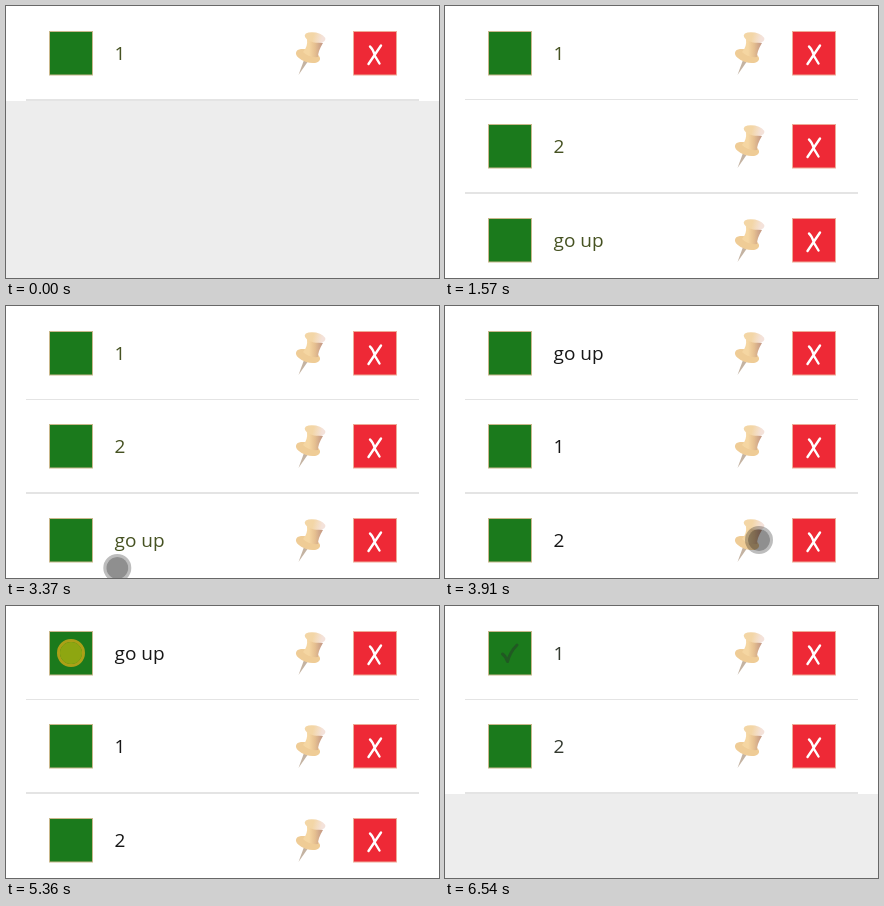
These frames come from a looping animation (433 by 272 pixels, 6860 ms). An HTML page:

```html
<!DOCTYPE html>
<html lang="en">
<head>
<meta charset="utf-8">
<title>Todo list</title>
<style>
  html, body { margin: 0; width: 100%; height: 100%; overflow: hidden; background: #fff; }
  svg { display: block; width: 433px; height: 272px; }
  text { font: 19px "Open Sans", "Noto Sans", sans-serif; }
</style>
</head>
<body>
<svg viewBox="0 0 433 272">
  <defs>
    <linearGradient id="cap">
      <stop offset=".4" stop-color="#f3d6a6"/>
      <stop offset=".85" stop-color="#f4e2da"/>
    </linearGradient>
    <linearGradient id="body">
      <stop offset=".3" stop-color="#f5d6a2"/>
      <stop offset=".6" stop-color="#e6c090"/>
      <stop offset=".9" stop-color="#c99f88"/>
    </linearGradient>
    <g id="pin">
      <path d="M298 54L292.5 69L301.5 56Z" fill="#c4b3a2"/>
      <ellipse cx="302" cy="50" rx="12.5" ry="6.2" transform="rotate(18 302 50)" fill="#efcc96"/>
      <path d="M301 33Q302 41 297 46Q303 52 312 51Q312 45 317 37Z" fill="url(#body)"/>
      <ellipse cx="309" cy="31.5" rx="10.5" ry="5" transform="rotate(12 309 31.5)" fill="url(#cap)"/>
    </g>
    <g id="row">
      <rect y="1" width="433" height="94" fill="#fff"/>
      <rect x="20" y="93" width="393" height="2" fill="#e4e4e4"/>
      <rect x="43.5" y="25.5" width="43" height="43.5" fill="#1b7a1c" stroke="#c9b88c"/>
      <use href="#pin"/>
      <rect x="347.5" y="25.5" width="43" height="43.5" fill="#ee2936" stroke="#eeaa98"/>
      <path d="M364 40.5Q367 43 369 50L373.5 57.5M375 39.5L362.5 58" fill="none" stroke="#fff" stroke-width="2.4" stroke-linecap="round"/>
      </g>
  </defs>
  <rect width="433" height="272" fill="#ededed"/>
  <rect width="433" height="4" fill="#fff"/>
  <g id="rows"></g>
  <path id="tick" d="M57.5 48Q60.5 50 62.5 55.5Q65 46 72 39" fill="none" stroke-linecap="round" stroke-linejoin="round"/>
  <rect id="strike" x="108" y="46.5" width="51" height="1.6" fill="#111"/>
  <g id="cursor" stroke-width="3">
    <circle r="12.5" fill="none"/>
    <circle r="11" stroke="none"/>
  </g>
</svg>
<script>
const LOOP = 6860, STEP = 53.3, CLICK = 120;
const TIMES = { second: 510, third: 1570, appear: 2580, pinned: 3910, done: 5460, removed: 6120, leave: 6540 };
const $ = id => document.getElementById(id);

// Pointer moves: Bezier control points, each curve starting where the last one ended
const START = [232, 19];
const MOVES = [
  { from: 2580, to: 2953, pace: 1.6, curve: [[228, 20], [315, 235], [236, 231]] },
  { from: 2953, to: 3770, pace: 1, curve: [[-10, 270], [140, 275], [314, 234]] },
  { from: 4130, to: 4716, pace: 1.6, curve: [[400, 180], [370, 36], [261, 32]] },
  { from: 4716, to: 5330, pace: 1, curve: [[104, 38], [45, 80], [65, 47]] },
  { from: 5530, to: 5950, pace: 1, curve: [[150, 65], [330, 60], [368, 47.5]] },
  { from: 6270, to: 6490, pace: 1, curve: [[372, 75], [395, 130], [417, 235]] }
];

const rows = [0, 93, 187].map(y => {
  $("rows").insertAdjacentHTML("beforeend",
    `<g transform="translate(0 ${y})"><use href="#row"/><text x="108.5" y="53.8"></text></g>`);
  return $("rows").lastElementChild;
});

function bezier([a, b, c, d], u) {
  const v = 1 - u;
  return [0, 1].map(k => v ** 3 * a[k] + 3 * v * v * u * b[k] + 3 * v * u * u * c[k] + u ** 3 * d[k]);
}

function pointer(time) {
  const i = MOVES.findLastIndex(m => m.from <= time);
  const { from, to, pace, curve } = MOVES[i];
  const origin = i ? MOVES[i - 1].curve[2] : START;
  const elapsed = Math.floor((time - from + 6) / STEP) * STEP;
  return bezier([origin, ...curve], Math.min(1, elapsed / (to - from)) ** pace);
}

function labelsAt(t) {
  if (t >= TIMES.removed) return ["1", "2"];
  if (t >= TIMES.pinned) return ["go up", "1", "2"];
  return ["1", "2", "go up"].slice(0, 1 + (t >= TIMES.second) + (t >= TIMES.third));
}

function show(el, on) {
  el.setAttribute("visibility", on ? "visible" : "hidden");
}

function drawCursor(t) {
  const visible = t >= TIMES.appear && t < TIMES.leave;
  show($("cursor"), visible);
  if (!visible) return;
  const clicked = [TIMES.pinned, TIMES.done, TIMES.removed].some(end => t >= end - CLICK && t < end);
  const [ring, core] = $("cursor").children;
  $("cursor").setAttribute("transform", `translate(${pointer(t)})`);
  ring.setAttribute("stroke", clicked ? "rgba(222,173,22,.75)" : "rgba(0,0,0,.26)");
  core.setAttribute("fill", clicked ? "rgba(182,181,14,.75)" : "rgba(0,0,0,.44)");
}

function render(t) {
  const labels = labelsAt(t);
  const removed = t >= TIMES.removed, done = t >= TIMES.done;
  const ink = t < TIMES.pinned ? "#465222" : removed ? "#343a30" : "#161616";
  rows.forEach((row, i) => {
    show(row, i < labels.length);
    row.lastElementChild.textContent = labels[i] || "";
    row.lastElementChild.setAttribute("fill", ink);
  });
  show($("tick"), done);
  $("tick").setAttribute("stroke", removed ? "#215923" : "#fff");
  $("tick").setAttribute("stroke-width", removed ? 3 : 2.2);
  show($("strike"), done && !removed);
  drawCursor(t);
}

const begin = performance.now();
function frame() {
  render((performance.now() - begin) % LOOP);
  requestAnimationFrame(frame);
}
frame();
</script>
</body>
</html>
```
